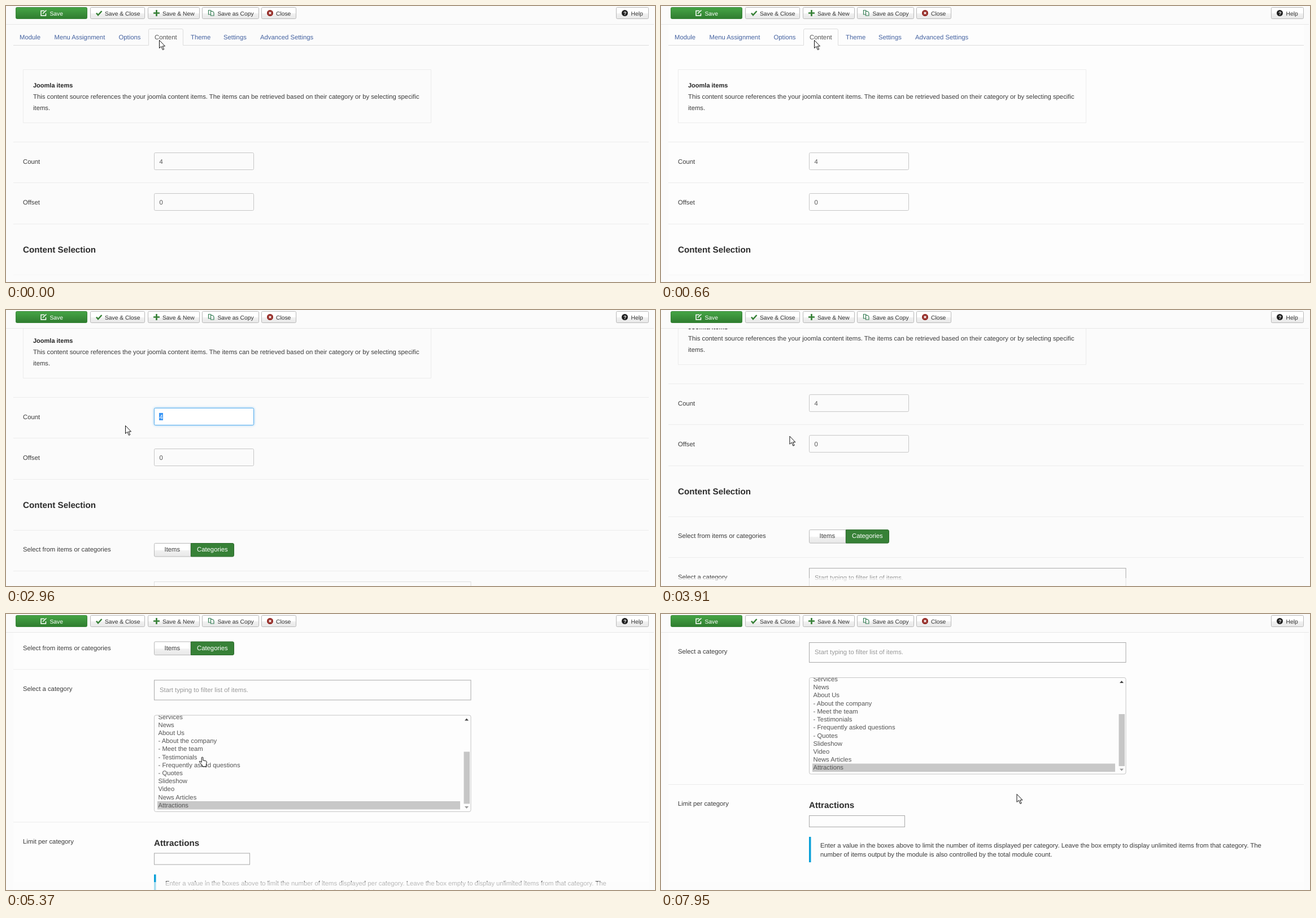
An HTML page for the animation above (8 s loop, 1149 px wide and 488 px high).

```html
<!DOCTYPE html>
<html lang="en">
<head>
<meta charset="utf-8">
<title>Module settings</title>
<style>
html, body { margin: 0; width: 100%; height: 100%; overflow: hidden; background: #fbfbfb; }
svg { display: block; }
text { font: 11.3px "Liberation Sans", Arial, sans-serif; fill: #3c3c3c; text-rendering: geometricPrecision; white-space: pre; }
.tabs text { fill: #4462a0; }
.tabs text.on, .field { fill: #555; }
.bar text { font-size: 10.3px; fill: #333; }
.head { font-size: 15.2px; font-weight: bold; fill: #2c2c2c; }
.bold { font-size: 11px; font-weight: bold; fill: #222; }
.note { font-size: 11.34px; }
.hint { fill: #999; }
.bar .light, .light { fill: #fff; }
.btn { fill: url(#grey); stroke: #b9b9b9; }
.box { fill: none; stroke: #c6c6c6; }
.dark { stroke: #a9a9a9; }
.line { fill: none; stroke: #ececec; }
.cursor path { fill: #fff; stroke: #111; stroke-linejoin: round; }
</style>
</head>
<body>
<svg width="1149" height="488" viewBox="0 0 1149 488">
  <defs>
    <linearGradient id="grey" x2="0" y2="1"><stop offset=".5" stop-color="#fff"/><stop offset=".55" stop-color="#f1f1f1"/><stop offset="1" stop-color="#e8e8e8"/></linearGradient>
    <linearGradient id="green" x2="0" y2="1"><stop stop-color="#46a546"/><stop offset="1" stop-color="#2f7d2f"/></linearGradient>
  </defs>
  <rect id="panel" x="13" y="33" width="1125" height="455" fill="#fdfdfd"/>

  <g id="page">
    <g class="tabs">
      <path d="M13 69.5H252.5V43q0-2.5 2.5-2.5H311q2.5 0 2.5 2.5V69.5H1138" fill="none" stroke="#ddd"/>
      <text x="24" y="58.5">Module</text>
      <text x="85.5" y="58.5">Menu Assignment</text>
      <text x="199.5" y="58.5">Options</text>
      <text x="263" y="58.5" class="on">Content</text>
      <text x="327" y="58.5">Theme</text>
      <text x="385" y="58.5">Settings</text>
      <text x="450" y="58.5">Advanced Settings</text>
    </g>
    <path class="line" d="M30.5 112.5H752.5V206.5H30.5z"/>
    <text class="bold" x="48" y="143.5">Joomla items</text>
    <text x="48" y="163.5">This content source references the your joomla content items. The items can be retrieved based on their category or by selecting specific</text>
    <text x="48" y="183.5">items.</text>
    <path class="line" d="M13 240.5H1138M13 312.5H1138M13 385.5H1138M13 475.5H1138M13 547.5H1138M13 817.5H1138"/>

    <text x="30" y="278.5">Count</text>
    <rect class="box" x="262.5" y="259.5" width="176" height="30" rx="2"/>
    <g id="focus">
      <rect x="262.5" y="259.5" width="176" height="30" rx="2" fill="#fff" stroke="#5cb0ee" style="filter:drop-shadow(0 0 2px #8cc8f4)"/>
      <rect id="mark" x="271" y="268" width="7" height="13" fill="#3a96f5"/>
    </g>
    <text id="count" class="field" x="271.5" y="278.5">4</text>

    <text x="30" y="351">Offset</text>
    <rect class="box" x="262.5" y="331.5" width="176" height="30" rx="2"/>
    <text class="field" x="271.5" y="351">0</text>

    <text class="head" x="30" y="435.5">Content Selection</text>

    <text x="30" y="513">Select from items or categories</text>
    <path class="btn" d="M327 498.5H264.5q-2 0-2 2V520q0 2 2 2H327z"/>
    <path d="M327.5 498.5H401q2.5 0 2.5 2.5V519.5q0 2.5-2.5 2.5H327.5z" fill="#378137" stroke="#2c6a2c"/>
    <text x="280.5" y="513">Items</text>
    <text class="light" x="338" y="513">Categories</text>

    <text x="30" y="585.5">Select a category</text>
    <rect class="box dark" x="262.5" y="566.5" width="560.5" height="35"/>
    <text class="hint" x="272" y="587">Start typing to filter list of items.</text>
    <rect class="box" x="262.5" y="628.5" width="560.5" height="170.5" rx="3"/>
    <svg x="263" y="629" width="560" height="169">
      <rect x="5" y="151.5" width="536" height="14.5" fill="#c8c8c8"/>
      <text id="list" class="field"></text>
      <rect x="547.5" y="64" width="10.5" height="92" fill="#c6c6c6"/>
      <path d="M549 9l3.5-4 3.5 4z" fill="#444"/>
      <path d="M549 160.500l3.5 4 3.5-4z" fill="#999"/>
    </svg>

    <text x="30" y="855">Limit per category</text>
    <text class="head" x="262" y="859">Attractions</text>
    <rect class="box dark" x="262.5" y="872.5" width="169" height="20"/>
    <rect x="262" y="910" width="3.5" height="45" fill="#0aa0d8"/>
    <text class="note" x="282" y="929">Enter a value in the boxes above to limit the number of items displayed per category. Leave the box empty to display unlimited items from that category. The</text>
    <text class="note" x="282" y="944.5">number of items output by the module is also controlled by the total module count.</text>
  </g>

  <rect y="474" width="1149" height="14" fill="#fcfcfc" opacity=".65"/>

  <g class="bar">
    <rect width="1149" height="33" fill="#fbfbfb"/>
    <path d="M0 32.5H1147" stroke="#e8e8e8"/>
    <rect x="17.5" y="2.5" width="126" height="20" rx="2" fill="url(#green)" stroke="#378537"/>
    <rect class="btn" x="149.5" y="2.5" width="96" height="20" rx="2"/>
    <rect class="btn" x="251.5" y="2.5" width="91" height="20" rx="2"/>
    <rect class="btn" x="347.5" y="2.5" width="100" height="20" rx="2"/>
    <rect class="btn" x="452.5" y="2.5" width="61" height="20" rx="2"/>
    <rect class="btn" x="1080.5" y="2.5" width="57" height="20" rx="2"/>
    <g fill="none" stroke-width="1.5">
      <path d="M68 8.5H62V17H70.5V13M65 13.5L71.5 7.5" stroke="#fff"/>
      <path d="M160 12.5l3 3.5 6.5-7" stroke="#378137" stroke-width="2.5"/>
      <path d="M261 12.5H272M266.5 7V18" stroke="#378137" stroke-width="2.7"/>
      <path d="M362 15H358.5V7.5H362l2 2M362.5 9.5H366l2 2.5V17H362.5z" stroke="#3a8058" stroke-width="1.2"/>
      <circle cx="467.5" cy="12.5" r="5.5" fill="#942a25"/>
      <path d="M465.5 10.5l4 4m0-4l-4 4" stroke="#fff"/>
      <circle cx="1095.5" cy="12.5" r="5.5" fill="#222"/>
    </g>
    <text class="light" x="1093.2" y="15.7" style="font-size:8.5px;font-weight:bold">?</text>
    <text class="light" x="77.5" y="16.5">Save</text>
    <text x="175" y="16.5">Save &amp; Close</text>
    <text x="277" y="16.5">Save &amp; New</text>
    <text x="374.5" y="16.5">Save as Copy</text>
    <text x="478" y="16.5">Close</text>
    <text x="1106.5" y="16.5">Help</text>
  </g>

  <g id="cursor" class="cursor">
    <path id="arrow" d="M.5 .5V14.5l3.3-3 2.7 6 2.2-1-2.7-5.5h4.5z"/>
    <path id="beam" style="fill:none" d="M.5 .5h5M3 .5v14M.5 14.5h5"/>
    <path id="hand" d="M4.5 1.5q1.3-1.6 2.6 0V6.5l4.9 1q1.7.4 1.7 2L12.6 15v2.5H5.6V15L.7 9.5q-.4-1.9 1.6-1.3L4.5 10z"/>
  </g>
</svg>
<script>
const LOOP = 8000, NOTCH = 86, GLIDE = 340;
const wheel = [1830, 3860, 4020, 4400, 4740, 5330];  // start of each wheel notch

// Cursor stops: [time, x, y]
const stops = [
  [1200, 271, 60], [1770, 287, 147], [2170, 285, 175], [2550, 283, 178], [2960, 211, 204], [3240, 224, 222],
  [3860, 224, 222], [4360, 341, 247], [5860, 342, 254], [6160, 345, 252], [6700, 345, 252],
  [7150, 308, 279], [7680, 345, 267], [7900, 345, 267], [7950, 629.5, 318]
];

const $ = id => document.getElementById(id);
const clamp = u => Math.min(1, Math.max(0, u));
const easeOut = u => 1 - (1 - u) ** 2;
const smooth = u => u * u * (3 - 2 * u);
const show = (id, on) => $(id).style.display = on ? '' : 'none';
const place = (id, x, y) => $(id).setAttribute('transform', `translate(${x} ${y})`);

const scrollAt = t => wheel.reduce((sum, start) => sum + NOTCH * easeOut(clamp((t - start) / GLIDE)), 0);

function cursorAt(t) {
  const next = stops.findIndex(s => s[0] > t);
  const b = stops.at(next), a = stops[Math.max(0, next - 1)] ;
  if (next < 1) return b.slice(1);
  const u = smooth((t - a[0]) / (b[0] - a[0]));
  return [1, 2].map(i => a[i] + (b[i] - a[i]) * u);
}

const items = ['Services', 'News', 'About Us', '- About the company', '- Meet the team', '- Testimonials',
  '- Frequently asked questions', '- Quotes', 'Slideshow', 'Video', 'News Articles', 'Attractions'];
$('list').innerHTML = items.map((s, i) => `<tspan x="6.5" y="${6 + i * 14.22}">${s}</tspan>`).join('');

function draw(now) {
  const t = now % LOOP;
  const within = (from, to) => t >= from && t < to;
  const beam = within(2170, 2800), hand = within(4360, 7920), marked = within(2700, 3510);
  place('page', 0, -scrollAt(t));
  place('cursor', ...cursorAt(t));
  show('beam', beam);
  show('hand', hand);
  show('arrow', !beam && !hand);
  show('focus', within(2570, 3510));
  show('mark', marked);
  $('count').style.fill = marked ? '#fff' : '';
  show('panel', within(400, 1230) || t >= 4060);
  requestAnimationFrame(draw);
}
requestAnimationFrame(draw);
</script>
</body>
</html>
```
